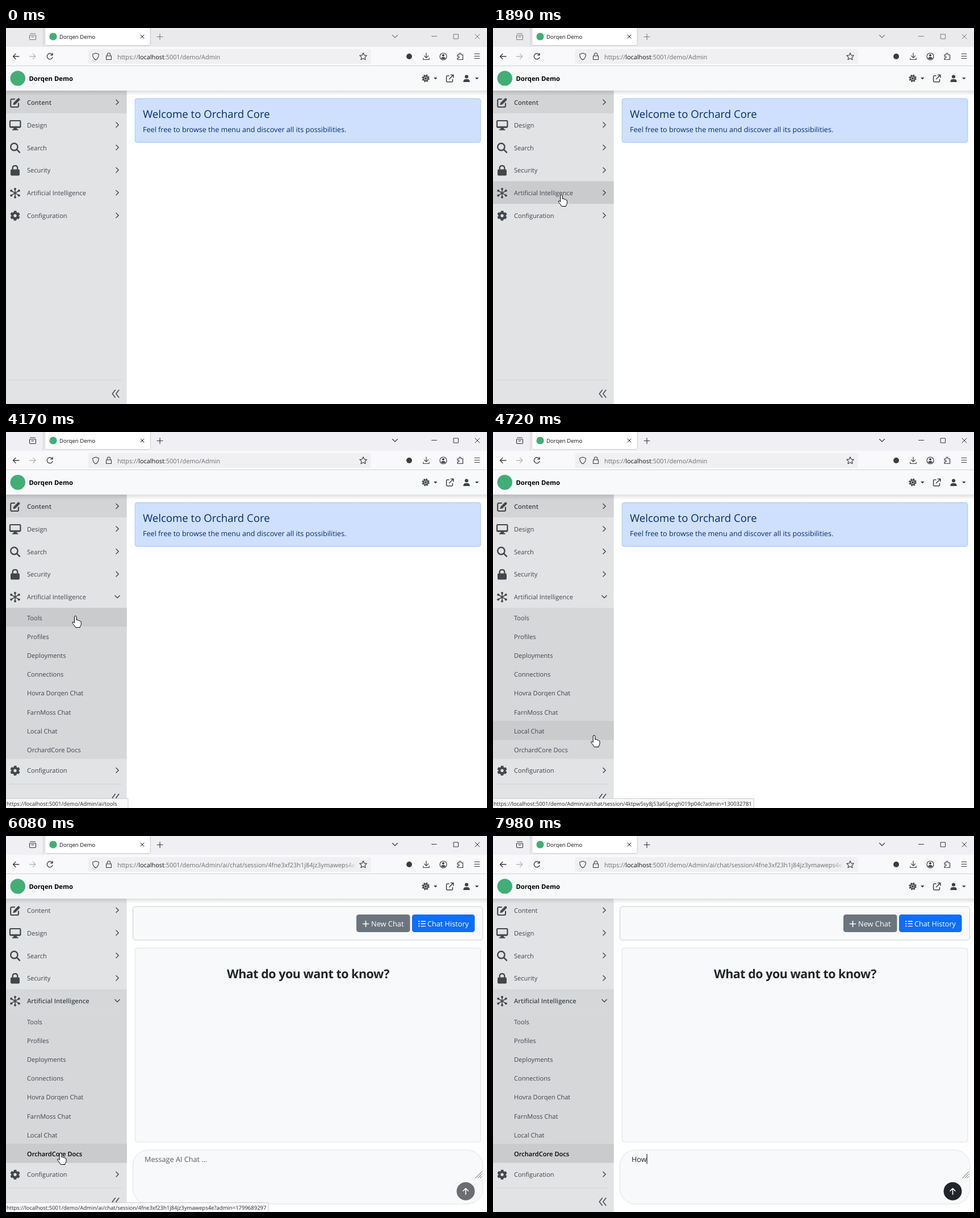
Recreate the animation shown at these times as an HTML page. Size 847 by 661 pixels, loop 8 s.

```html
<!DOCTYPE html>
<html lang="en">
<head>
<meta charset="utf-8">
<title>Admin demo</title>
<style>
html, body { margin: 0; width: 100%; height: 100%; overflow: hidden; background: #fff; }
svg { display: block; width: 847px; height: 661px; }
text { font-family: "Open Sans", "Noto Sans", sans-serif; text-rendering: geometricPrecision; white-space: pre; }
.line { fill: none; stroke: currentColor; stroke-linecap: round; stroke-linejoin: round; }
.fill { fill: currentColor; }
</style>
</head>
<body>
<svg id="stage" viewBox="0 0 847 661" xmlns="http://www.w3.org/2000/svg"></svg>
<script>
const LOOP = 8000;
const SIDE = 212.6, ROW = 39.8, SUB_TOP = 309.2, SUB_ROW = 33.16, SUB_H = SUB_ROW * 8;
const BASE = '/demo/Admin';
const DOCS = '/ai/chat/session/4fne3xf23h1j84jz3ymaweps4e';
const TIMES = { focus: 2220, open: 2520, opened: 2960, click: 5810, loaded: 6080,
                statusOff: 6700, caret: 6760, blink: 7230, type: 7710 };

// markup helpers
const text = (x, y, size, str, extra = '') =>
  `<text x="${x}" y="${y}" font-size="${size}" ${extra}>${str}</text>`;
const rect = (x, y, w, h, fill, extra = '') =>
  `<rect x="${x}" y="${y}" width="${w}" height="${h}" fill="${fill}" ${extra}/>`;
const line = (d, w = 1.1, extra = '') => `<path class="line" d="${d}" stroke-width="${w}" ${extra}/>`;
const fill = (d, extra = '') => `<path class="fill" d="${d}" ${extra}/>`;
const ring = (x, y, r, w = 1.1, extra = '') =>
  `<circle class="line" cx="${x}" cy="${y}" r="${r}" stroke-width="${w}" ${extra}/>`;
const dot = (x, y, r) => `<circle class="fill" cx="${x}" cy="${y}" r="${r}"/>`;
const at = (x, y, body, extra = '') => `<g transform="translate(${x} ${y})" ${extra}>${body}</g>`;

// sidebar icons, each around its own centre
const nodes = [[0, -7.3], [0, 7.3], [-6.8, -4.2], [6.8, 4.2], [-6.8, 4.2], [6.8, -4.2]];
const icons = {
  edit: line('M-1-6H-5.5Q-7.8-6-7.8-3.7V5.7Q-7.8 8-5.5 8H3.7Q6 8 6 5.7V1.5', 2.1) +
        fill('M-3.6 4.2L-2.7.4 4.6-7Q5.8-8.6 7.4-7.2L8-6.6Q9.4-5.2 8-4L.4 3.4Z'),
  desktop: `<rect class="line" x="-9" y="-7.8" width="18.4" height="11.6" rx="1.3" stroke-width="2.2"/>` +
        fill('M-9 2H9.4V4H-9ZM-2.5 4.5H3L3.5 7.2H5.5V9H-5V7.2H-3Z'),
  search: ring(-1.6, -1.6, 6.2, 2.4) + line('M3.2 3.2L8 8', 2.6),
  lock: fill('M-6-1.8H6Q8-1.8 8 .2V7Q8 9 6 9H-6Q-8 9-8 7V.2Q-8-1.8-6-1.8Z') +
        line('M-4.3-1V-4Q-4.3-8.2 0-8.2T4.3-4V-1', 2.3),
  nodes: line('M0-7V7M-6.8-4.2L6.8 4.2M-6.8 4.2L6.8-4.2', 1.6) + nodes.map(([x, y]) => dot(x, y, 2)).join(''),
  gear: ring(0, 0, 4.8, 4.2) +
        ring(0, 0, 7.2, 2.9, 'stroke-dasharray="4.4 3.14" style="stroke-linecap:butt" transform="rotate(12.5)"')
};
const chevron = line('M-2.1-4.2L2.2 0-2.1 4.2', 1.4);

const menuRow = (i, label, icon) => {
  const y = 131 + ROW * i;
  return `<g id="row${i}">` + at(16, y, icons[icon]) + text(37, Math.round(y + 4), 11.1, label, `id="label${i}"`) +
    at(196, y - .6, `<g id="chev${i}">${chevron}</g>`) + '</g>';
};
const menu = [['Content', 'edit'], ['Design', 'desktop'], ['Search', 'search'], ['Security', 'lock'],
              ['Artificial Intelligence', 'nodes'], ['Configuration', 'gear']];
const subs = [
  ['Tools', '/ai/tools'], ['Profiles', '/ai/profiles'], ['Deployments', '/ai/deployments'],
  ['Connections', '/ai/connections'],
  ['Hovra Dorqen Chat', '/ai/chat/session/4mw2d7rk9hv53b68qnta01yx4c?admin=1300327815'],
  ['FarnMoss Chat', '/ai/chat/session/4gk8s5ty2j73c65pmwh094q0dn?admin=1300327841'],
  ['Local Chat', '/ai/chat/session/4ktpw5sy8j53a65pngh019p04c?admin=130032781'],
  ['OrchardCore Docs', DOCS + '?admin=1799689297']
];

const strip = `
  <rect id="strip" width="847" height="33"/>
  <g id="stripIcons">
    ${line('M41.5 13H52.5V19Q52.5 20.5 51 20.5H43Q41.5 20.5 41.5 19ZM42.5 10H51.5M45 15.8H49', 1.1)}
    ${line('M266 15.5H276M271 10.5V20.5M680.5 12.5L685 17 689.5 12.5')}
    ${line('M749.5 14.5H758.5M788.5 11H796.5V19H788.5ZM826 11L834 19M834 11L826 19', 1)}
  </g>
  ${rect(65, 0, 1, 33, '#cfcfd4')}
  ${rect(69, -3, 184.5, 33, '#fff', 'rx="3.5" filter="url(#tabShadow)"')}
  <circle id="favicon" cx="83" cy="15" r="6.6" fill="#43ad76"/>
  ${rect(82, 14, 5, 2, '#5f5f68', 'id="spinner" rx="1"')}
  <g clip-path="url(#tabClip)">${text(94, 19, 9.6, '', 'id="tabTitle" fill="#15141a"')}</g>
  ${rect(214, 6, 18, 18, 'url(#tabFade)', 'id="tabFadeBox"')}
  <g color="#222">${line('M237 12L243 18M243 12L237 18', 1)}</g>`;

const toolbar = `
  ${rect(0, 33, 847, 34, '#f9f9fb')}${rect(0, 66, 847, 1, '#d2d2d6')}
  ${rect(144.5, 37, 498, 26, '#f0f0f2', 'rx="3.5"')}
  <g color="#3c3c44">
    ${line('M12.5 50H23M17 45.5L12.5 50 17 54.5', 1.3)}
    ${line('M41.5 50H52M47.5 45.5L52 50 47.5 54.5', 1.3, 'opacity=".35"')}
    ${line('M81.6 47.2A5 5 0 1 0 82 51.5M82 44.5V47.8H78.7', 1.3)}
    ${line('M158 44.3L163.3 46Q163.6 53 158 56 152.4 53 152.7 46Z')}
    ${line('M176.5 49H185.5V55.5H176.5ZM178.3 49V46.8Q178.3 44 181 44T183.7 46.8V49')}
    ${line('M629 43.8L630.9 47.9 635.3 48.4 632 51.4 633 55.8 629 53.6 625 55.8 626 51.4 622.7 48.4 627.1 47.9Z')}
    <circle class="fill" cx="710" cy="50" r="5"/>
    ${line('M740 44V52M736.5 48.8L740 52.3 743.5 48.8M734.8 53V55.5H745.2V53', 1.2)}
    ${ring(770, 50, 6, 1.2)}${dot(770, 48, 2)}${fill('M766.3 53.5Q766.5 51 770 51T773.7 53.5Q770 56 766.3 53.5Z')}
    ${line('M795 47H798V45.5Q798 44 799.5 44T801 45.5V47H804.5V55.5H795V52.8H796.5Q798 52.8 798 51.3T796.5 49.8H795Z', 1.2)}
    ${line('M825 45.5H834M825 49.5H834M825 53.5H834', 1.1)}
  </g>
  <g clip-path="url(#urlClip)">${text(196, 54.5, 10.9, '', 'id="url" fill="#6b6b72"')}</g>
  ${rect(596, 40, 22, 20, 'url(#urlFade)', 'id="urlFadeBox"')}`;

const header = `
  ${rect(0, 110, 847, 9, 'url(#shadow)')}
  ${rect(0, 67, 847, 43, '#f8f9fa')}
  <circle cx="20.8" cy="88.4" r="13.2" fill="#43ad76"/>
  ${text(40.5, 93, 11.3, 'Dorqen Demo', 'font-weight="700" fill="#000"')}
  <g color="#3f4347">
    ${at(739, 88.5, dot(0, 0, 5) + ring(0, 0, 5.7, 2, 'stroke-dasharray="2.6 1.87" style="stroke-linecap:butt"') +
      '<circle r="2.6" fill="none" stroke="#f8f9fa"/>')}
    ${fill('M753 87H759.6L756.3 90.4ZM826 87H832.6L829.3 90.4Z')}
    ${line('M780 84H777Q775.6 84 775.6 85.4V93.4Q775.6 94.8 777 94.8H785Q786.4 94.8 786.4 93.4V90.4M783.4 82.6H787.8V87M787.4 83L780.6 89.8', 1.5)}
    ${dot(811, 85.5, 3.1)}${fill('M805.3 95Q805.3 89.9 809.5 89.9H812.5Q816.7 89.9 816.7 95Z')}
  </g>`;

const sidebar = `
  ${rect(0, 110, SIDE, 551, '#e2e3e5')}
  ${rect(0, 110, SIDE, 40, '#d3d4d6', 'id="contentBg"')}
  ${rect(0, 269.4, SIDE, ROW, '#d6d7d9', 'id="aiBg"')}
  ${rect(0, SUB_TOP, SIDE, 0, '#d6d7d9', 'id="subBg"')}
  ${rect(0, 0, SIDE, 0, '#cacbcd', 'id="hover"')}
  ${rect(0, SUB_TOP + SUB_ROW * 7, SIDE, SUB_ROW, '#cacbcd', 'id="docsBg"')}
  <g fill="#41464c" color="#43474c">
    ${menu.map(([label, icon], i) => menuRow(i, label, icon)).join('')}
    <g clip-path="url(#subClip)">
      ${subs.map(([label], i) => text(37, Math.round(330.7 + SUB_ROW * i), 11.1, label, `id="sub${i}"`)).join('')}
    </g>
    ${rect(5, 618.5, 199, 1, '#d0d1d4')}
    ${line('M192.3 636.5L187.3 643 192.3 649.5M198.8 636.5L193.8 643 198.8 649.5', 1.5)}
  </g>`;

const welcome = `<g id="welcome" fill="#052c65">
  ${rect(227.2, 124, 608.6, 77.2, '#cfe0ff', 'rx="4" stroke="#9ec5fe"')}
  ${text(241, 158, 18.6, 'Welcome to Orchard Core')}
  ${text(241, 183, 12.6, 'Feel free to browse the menu and discover all its possibilities.')}
</g>`;

const chat = `<g id="chat">
  ${rect(223.5, 124, 616, 59, '#f8f9fa', 'rx="4.5" stroke="#cbcdd0"')}
  ${rect(617, 138, 94.5, 31, '#6c757d', 'rx="4.5"')}${rect(715, 138, 110.5, 31, '#0d6efd', 'rx="4.5"')}
  <g fill="#fff" color="#fff">
    ${line('M628.5 154.5H638.5M633.5 149.5V159.5', 1.6)}${text(643, 159, 12.8, 'New Chat')}
    ${line('M731 150H738.5M731 154.3H738.5M731 158.6H738.5', 1.4)}${line('M727 150H727.6M727 154.3H727.6M727 158.6H727.6', 2)}
    ${text(742, 159, 12.7, 'Chat History')}
  </g>
  ${rect(227.2, 197, 608.6, 341, '#f8f9fa', 'rx="4" stroke="#dee1e5"')}
  ${text(532, 250.3, 21.4, 'What do you want to know?', 'font-weight="700" fill="#212529" text-anchor="middle" letter-spacing="-.45"')}
  ${rect(223.5, 552, 616, 95, '#f8f9fa', 'rx="27" stroke="#dee1e5"')}
  ${text(244, 573, 12.65, 'Message AI Chat ...', 'id="prompt" fill="#595f66"')}
  ${text(244, 573, 12.65, '', 'id="typed" fill="#212529"')}
  ${rect(244, 559, 1, 17.5, '#000', 'id="caret"')}
  <g color="#55585c">${line('M827 601L837.5 590.5M831 601L837.5 594.5M835 601L837.5 598.5', 1)}</g>
  <circle id="send" cx="809.5" cy="624.5" r="16"/>
  <g color="#fff">${line('M809.5 630V619.5M805 624L809.5 619.5 814 624', 1.6)}</g>
</g>`;

const cursors = `<g id="cursor" fill="#fff" stroke="#000" stroke-linejoin="round">
  <path id="hand" d="M-1.8 10V1Q-1.8-.9 0-.9T1.8 1V6.2Q4.6 5.4 5 7.2 7.6 6.6 8 8.4 10 8.2 10 10.4V13.5Q9.8 16.5 8 18V19.5H.3Q-1.4 16-4.9 12.3-6 10.4-4.6 9.8-3.4 9.4-1.8 11.6Z"/>
  <path id="arrow" d="M0 0V13.6L3.2 10.6 5.4 15.6 7.7 14.6 5.5 9.8H9.8Z" stroke-width=".9"/>
  <path id="beam" d="M-2.5-6.5H-.8L0-5.8.8-6.5H2.5M0-5.8V5.8M-2.5 6.5H-.8L0 5.8.8 6.5H2.5" fill="none" stroke="#55585c"/>
</g>`;

const fade = (id, color) => `<linearGradient id="${id}"><stop stop-color="${color}" stop-opacity="0"/><stop offset="1" stop-color="${color}"/></linearGradient>`;
const clip = (id, x, y, w, h, extra = '') => `<clipPath id="${id}">${rect(x, y, w, h, '#000', extra)}</clipPath>`;

document.getElementById('stage').innerHTML = `<defs>
  ${fade('tabFade', '#fff')}${fade('urlFade', '#f0f0f2')}
  <linearGradient id="shadow" x2="0" y2="1"><stop stop-opacity=".12"/><stop offset="1" stop-opacity="0"/></linearGradient>
  <filter id="tabShadow" x="-5%" y="-20%" width="110%" height="140%"><feDropShadow dx="0" dy="0" stdDeviation="1.2" flood-opacity=".4"/></filter>
  ${clip('tabClip', 90, 0, 142, 33)}${clip('urlClip', 190, 37, 428, 26)}
  ${clip('subClip', 0, SUB_TOP, SIDE, 0, 'id="subMask"')}
</defs>
${rect(0, 0, 847, 661, '#fff')}${strip}${toolbar}${sidebar}${welcome}${chat}${header}
<g id="status"><rect id="statusBox" x="-1" y="644.5" height="18" fill="#f9f9fb" stroke="#cdcdd1"/>
${text(1, 656.7, 9.5, '', 'id="statusText" fill="#2b2a33"')}</g>
${cursors}`;

const el = {};
document.querySelectorAll('[id]').forEach(n => { el[n.id] = n; });
const set = (id, attrs) => { for (const k in attrs) el[id].setAttribute(k, attrs[k]); };
const show = (id, on) => { el[id].style.display = on ? '' : 'none'; };
const write = (id, str) => { if (el[id].textContent !== str) el[id].textContent = str; };
const bold = (id, on) => set(id, { 'font-weight': on ? 600 : 400 });

// time, x, y of the pointer tip
const path = [
  [1330, 818, 640], [1400, 780, 590], [1540, 545, 425], [1680, 235, 300], [1760, 137, 263],
  [1890, 120.5, 294], [2150, 120.5, 294], [2450, 116, 296], [4030, 116, 296], [4300, 128, 350],
  [4500, 152, 440], [4720, 178, 534], [4790, 176, 545], [5270, 68, 557], [5470, 68, 557],
  [5540, 96, 558], [6150, 96, 558], [6490, 300, 577], [6620, 300, 577], [6760, 294, 574]
];
function pointer(t) {
  const i = path.findIndex(p => p[0] > t);
  if (i < 0) return path[path.length - 1].slice(1);
  if (i === 0) return path[0].slice(1);
  const [a, b] = [path[i - 1], path[i]], k = (t - a[0]) / (b[0] - a[0]);
  return [a[1] + (b[1] - a[1]) * k, a[2] + (b[2] - a[2]) * k];
}

// which menu entry lies under the pointer
function hit(x, y, open) {
  if (x >= SIDE || y < 110.2) return null;
  if (y < SUB_TOP) {
    const row = Math.floor((y - 110.2) / ROW);
    return { row, y: 110.2 + row * ROW, h: ROW };
  }
  const end = SUB_TOP + SUB_H * open;
  if (y < end) {
    const sub = Math.floor((y - SUB_TOP) / SUB_ROW);
    return { sub, y: SUB_TOP + sub * SUB_ROW, h: SUB_ROW };
  }
  return y < end + ROW ? { row: 5, y: end, h: ROW } : null;
}

function statusFor(t, over) {
  const host = 'https://localhost:5001' + BASE;
  if (t < TIMES.focus || t >= TIMES.statusOff) return '';
  if (t >= TIMES.loaded) return host + subs[7][1];
  if (t >= TIMES.click) return 'localhost';
  if (!over) return '';
  return host + (over.sub === undefined ? '#m3687640' : subs[over.sub][1]);
}

let shownUrl = null;
function setUrl(tail) {
  if (shownUrl === tail) return;
  shownUrl = tail;
  el.url.innerHTML = 'https://<tspan fill="#15141a">localhost</tspan>:5001' + tail;
}

function render(t) {
  const focused = t >= TIMES.focus, clicked = t >= TIMES.click, loaded = t >= TIMES.loaded;
  const loading = clicked && !loaded;
  const p = Math.min(1, Math.max(0, (t - TIMES.open) / (TIMES.opened - TIMES.open)));
  const open = p * p * (3 - 2 * p);
  const [x, y] = pointer(t);
  const over = t >= path[0][0] ? hit(x, y, open) : null;

  set('strip', { fill: focused ? '#f0f0f4' : '#eaeaec' });
  set('stripIcons', { color: focused ? '#33333a' : '#77777d' });
  write('tabTitle', loading ? 'localhost:5001/demo/Admin/ai/chat' : 'Dorqen Demo');
  show('favicon', !loading);
  show('spinner', loading);
  show('tabFadeBox', loading);
  setUrl(BASE + (clicked ? DOCS + '?' : ''));
  show('urlFadeBox', loaded);

  set('subBg', { height: SUB_H * open });
  set('subMask', { height: SUB_H * open });
  set('row5', { transform: `translate(0 ${SUB_H * open})` });
  set('chev4', { transform: `rotate(${90 * open})` });
  show('contentBg', !loaded);
  show('aiBg', loaded);
  show('docsBg', loaded);
  bold('label0', !loaded);
  bold('label4', loaded);
  bold('sub7', loaded);
  set('sub7', { fill: loaded ? '#000' : '#41464c' });
  show('hover', over);
  if (over) set('hover', { y: over.y, height: over.h });

  show('welcome', !loaded);
  show('chat', loaded);
  const word = 'How'.slice(0, t < 7780 ? 0 : t < 7890 ? 1 : t < 7970 ? 2 : 3);
  write('typed', word);
  show('prompt', !word);
  set('send', { fill: word ? '#212529' : '#6b6d70' });
  show('caret', t >= TIMES.caret && (t < TIMES.blink || t >= TIMES.type));
  set('caret', { x: 244 + (word ? el.typed.getComputedTextLength() : 0) });

  const note = statusFor(t, over);
  show('status', note);
  write('statusText', note);
  if (note) set('statusBox', { width: Math.max(216, el.statusText.getComputedTextLength() + 5.5) });

  const kind = loaded && x > 224 && y > 552 ? 'beam' : over && !loading ? 'hand' : 'arrow';
  show('cursor', t >= path[0][0] && t < TIMES.type);
  set('cursor', { transform: `translate(${x.toFixed(1)} ${y.toFixed(1)})` });
  ['hand', 'arrow', 'beam'].forEach(k => show(k, k === kind));
}

const start = performance.now();
function tick() {
  render((performance.now() - start) % LOOP);
  requestAnimationFrame(tick);
}
tick();
</script>
</body>
</html>
```
